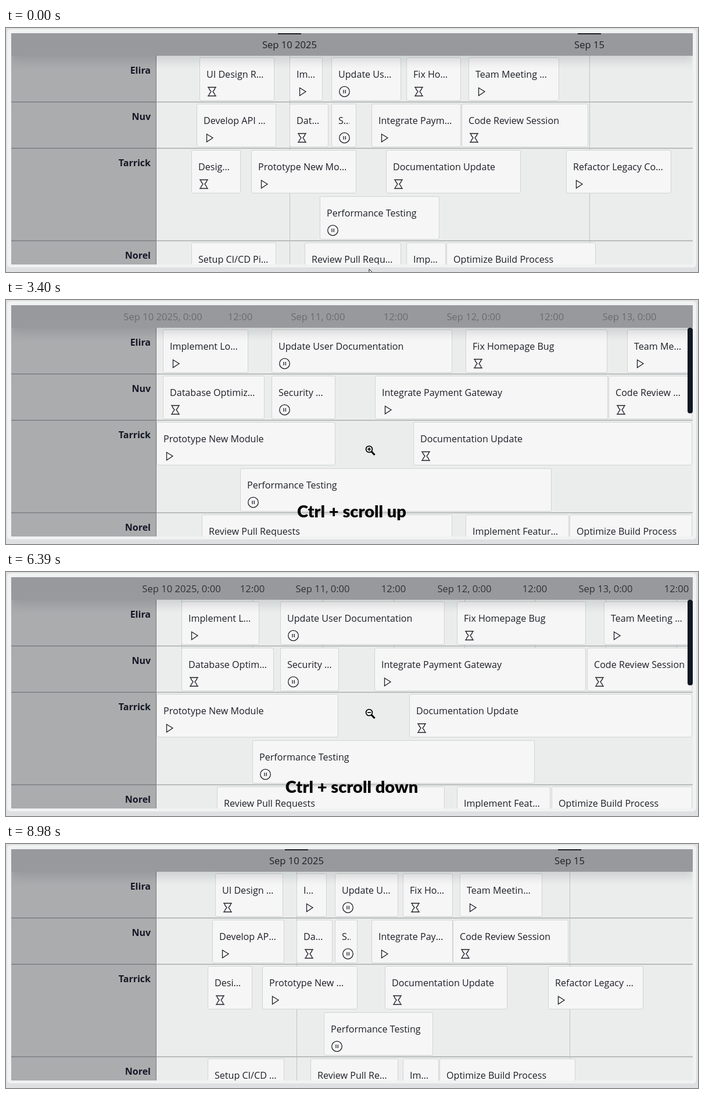
An HTML page that plays this animation: 1191 by 422 pixels, repeating every 9050 ms.

```html
<!DOCTYPE html>
<html lang="en">
<head>
<meta charset="utf-8">
<title>Zoomable schedule</title>
<style>
html, body { margin: 0; width: 100%; height: 100%; overflow: hidden; background: #dfe0e1; }
#stage { position: relative; width: 1191px; height: 422px; overflow: hidden; font-family: "Open Sans", "Noto Sans", sans-serif; color: #1d1f27; }
#stage * { box-sizing: border-box; }
#stage div, #stage svg { position: absolute; }
#panel { left: 2px; top: 2px; width: 1186px; height: 412px; border-radius: 6px; background: #f1f2f2; }
#view { left: 9px; top: 9px; width: 1173px; height: 400px; overflow: hidden; background: #eaedec; }
#space { left: -9px; top: -9px; width: 1191px; height: 422px; }
#side { left: 9px; top: 48px; width: 250px; height: 374px; background: #abacae; border-right: 1px solid #77787b; }
#head { left: 9px; top: 9px; width: 1173px; height: 39px; background: #98999d; box-shadow: 0 9px 16px rgba(40, 44, 52, .15); }
.rule { left: 9px; width: 1173px; height: 2px; background: linear-gradient(90deg, #88898c 250px, #b9bbbc 250px); }
.person { right: 942px; font: 700 16px/22px "Open Sans", "Noto Sans", sans-serif; color: #141826; }
.card { height: 75px; overflow: hidden; background: #f6f6f6; border: 1px solid #d2d4d4; border-radius: 3px; }
.card .title { left: 11px; right: 11px; top: 16px; font-size: 16.1px; line-height: 25px; white-space: nowrap; overflow: hidden; text-overflow: ellipsis; }
.card svg { left: 11px; top: 48px; width: 22px; height: 22px; fill: none; stroke: #1d1f27; stroke-width: 1.3; }
.line { top: 48px; width: 1px; background: #c0c3c4; }
.bar { top: 8px; width: 40px; height: 3px; background: #1b1d24; }
.label { top: 17px; width: 200px; text-align: center; font-size: 16.6px; line-height: 24px; white-space: nowrap; }
#scroll { left: 1173px; top: 48px; width: 9px; height: 148px; border-radius: 4px; background: #101822; }
#caption { left: 295px; width: 600px; text-align: center; font: 900 29px/36px Lato, "Open Sans", sans-serif; color: #070707; white-space: nowrap; }
#cursor { left: 0; top: 0; width: 24px; height: 24px; overflow: visible; }
</style>
</head>
<body>
<div id="stage">
  <div id="panel"></div>
  <div id="view"><div id="space">
    <div id="lines"></div>
    <div id="side"></div>
    <div id="rows"></div>
    <div id="head"></div>
    <div id="ticks"></div>
    <div id="scroll"></div>
  </div></div>
  <div id="caption"></div>
  <svg id="cursor">
    <path id="arrow" d="M0 0V16L4 12.5 6.6 18.4 9 17.3 6.5 11.6H11.6Z" fill="#fff" stroke="#111"/>
    <g id="lens" stroke="#000" fill="none">
      <path d="M4 4L9.5 10" stroke-width="3.2"/>
      <circle r="5.4" fill="#fff" stroke-width="1.8"/>
      <path id="sign" stroke-width="1.7"/>
    </g>
  </svg>
</div>
<script>
const LOOP = 9050, LEFT = 259, RIGHT = 1181;
const ANCHOR_X = 625, ANCHOR_DAY = 1.3275, DAY_WIDTH = 103.2, ZOOM = 1.1;

const ICONS = {
  wait: '<path d="M2 2.5H17M2 17.5H17M4 2.5C4 7 7 8 8 10 7 12 4 13 4 17.5M15 2.5C15 7 12 8 11 10 12 12 15 13 15 17.5"/>',
  play: '<path d="M5.5 3.5L16 10 5.5 17Z"/>',
  pause: '<circle cx="10.5" cy="10" r="8.8"/><path d="M9 7V13M12.3 7V13"/>'
};

// title, icon, start and end in days after Sep 10, optional second lane
const PEOPLE = [
  { name: 'Elira', top: 48, tasks: [
    ['UI Design Review', 'wait', -1.5, -.25],
    ['Implement Login', 'play', 0, .55],
    ['Update User Documentation', 'pause', .7, 1.862],
    ['Fix Homepage Bug', 'wait', 1.947, 2.86],
    ['Team Meeting Preparation', 'play', 2.988, 4.5]] },
  { name: 'Nuv', top: 128, tasks: [
    ['Develop API Endpoint', 'play', -1.55, -.225],
    ['Database Optimization', 'wait', 0, .654],
    ['Security Audit', 'pause', .7, 1.112],
    ['Integrate Payment Gateway', 'play', 1.365, 2.862],
    ['Code Review Session', 'wait', 2.867, 4.985]] },
  { name: 'Tarrick', top: 208, tasks: [
    ['Design Mockups', 'wait', -1.637, -.81],
    ['Prototype New Module', 'play', -.638, 1.11],
    ['Documentation Update', 'wait', 1.613, 3.86],
    ['Refactor Legacy Code', 'play', 4.613, 6.363],
    ['Performance Testing', 'pause', .5, 2.5, 1]] },
  { name: 'Norel', top: 368, tasks: [
    ['Setup CI/CD Pipeline', 'wait', -1.637, -.225],
    ['Review Pull Requests', 'pause', .25, 1.862],
    ['Implement Feature X', 'play', 1.947, 2.611],
    ['Optimize Build Process', 'wait', 2.616, 5.11]] }
];

// start, interval, first level, last level of each wheel burst
const BURSTS = [[2050, 45, 1, 9], [3260, 1, 10, 10], [3410, 20, 11, 14], [5890, 70, 13, 9], [6800, 70, 8, -1]];
const REDRAWS = [2410, 3305, 3470, 6170, 7430];
const PATH = [[0, 625, 417], [70, 625, 410], [300, 622, 300], [550, 619, 235], [1099, 619, 235], [1100, 619, 242],
  [1370, 619, 242], [1580, 625, 258], [4810, 625, 258], [5090, 625, 243], [8770, 625, 243], [8980, 625, 420]];

const $ = id => document.getElementById(id);
const clamp = (v, lo = 0, hi = 1) => Math.min(hi, Math.max(lo, v));
const ramp = (t, from, to) => clamp((t - from) / (to - from));

function add(parent, cls, html = '') {
  const el = document.createElement('div');
  el.className = cls;
  el.innerHTML = html;
  return parent.appendChild(el);
}

const cards = [];
for (const { name, top, tasks } of PEOPLE) {
  if (top > 48) add($('rows'), 'rule').style.top = top - 1 + 'px';
  for (const [title, icon, start, end, lane = 0] of tasks) {
    const el = add($('rows'), 'card', `<div class="title">${title}</div><svg>${ICONS[icon]}</svg>`);
    el.style.top = top + 3 + lane * 80 + 'px';
    cards.push({ el, start, end });
  }
  const person = add($('space'), 'person', name);
  person.style.top = top + 14 + 'px';
  $('space').insertBefore(person, $('head'));
}
const ticks = Array.from({ length: 12 }, () => ({
  line: add($('lines'), 'line'), bar: add($('ticks'), 'bar'), label: add($('ticks'), 'label')
}));

function zoomLevel(t) {
  let level = 0;
  for (const [start, gap, from, to] of BURSTS) {
    if (t < start) break;
    const count = Math.min(Math.floor((t - start) / gap), Math.abs(to - from));
    level = from + Math.sign(to - from) * count;
  }
  return level;
}

function tickText(day, step, first) {
  const whole = Math.floor(day), clock = day > whole ? '12:00' : '0:00';
  if (day > whole && !first) return clock;
  return `Sep ${10 + whole}${first ? ' 2025' : ''}${step < 1 ? ', ' + clock : ''}`;
}

function drawTicks(t, scale, toX) {
  const step = scale / 2 >= 115 ? .5 : scale >= 115 ? 1 : 5;
  const age = t - REDRAWS.reduce((last, s) => s <= t ? s : last, -1000);
  const firstDay = Math.ceil((ANCHOR_DAY + (LEFT - ANCHOR_X) / scale) / step) * step;
  ticks.forEach(({ line, bar, label }, i) => {
    const day = firstDay + i * step, x = Math.round(toX(day));
    const display = x <= RIGHT ? 'block' : 'none';
    for (const el of [line, bar, label]) el.style.display = display;
    line.style.left = x + 'px';
    line.style.height = 361 * ramp(age, 100, 550) + 'px';
    bar.style.left = x - 20 + 'px';
    bar.style.opacity = ramp(age, 340, 550);
    label.style.left = x - 100 + 'px';
    label.style.opacity = ramp(age, 0, 260);
    label.textContent = tickText(day, step, i === 0);
  });
}

function drawCards(toX) {
  for (const { el, start, end } of cards) {
    const from = clamp(Math.round(toX(start)), LEFT, RIGHT), to = clamp(Math.round(toX(end)), LEFT, RIGHT);
    el.style.display = to - from > 1 ? 'block' : 'none';
    el.style.left = from + 'px';
    el.style.width = to - from + 'px';
  }
}

function drawCursor(t) {
  const i = Math.max(1, PATH.findIndex(p => p[0] > t));
  const [a, b] = t >= 8980 ? [PATH.at(-1), PATH.at(-1)] : [PATH[i - 1], PATH[i]];
  const k = a === b ? 0 : ramp(t, a[0], b[0]);
  const x = a[1] + (b[1] - a[1]) * k, y = a[2] + (b[2] - a[2]) * k;
  $('cursor').style.transform = `translate(${Math.round(x)}px, ${Math.round(y)}px)`;
  $('cursor').style.display = t < 8980 ? 'block' : 'none';
  const lens = t >= 1100 && t < 8840;
  $('arrow').style.display = lens ? 'none' : 'inline';
  $('lens').style.display = lens ? 'inline' : 'none';
  $('sign').setAttribute('d', t < 5090 ? 'M-3 0H3M0 -3V3' : 'M-3 0H3');
}

function drawCaption(t) {
  const up = t < 5500, caption = $('caption');
  caption.textContent = up ? 'Ctrl + scroll up' : 'Ctrl + scroll down';
  caption.style.top = up ? '347px' : '353px';
  caption.style.opacity = up ? +(t >= 2050) * (1 - ramp(t, 4810, 5090)) : +(t >= 5890) * (1 - ramp(t, 8770, 8980));
}

function render(t) {
  const scale = DAY_WIDTH * ZOOM ** zoomLevel(t);
  const toX = day => ANCHOR_X + (day - ANCHOR_DAY) * scale;
  drawTicks(t, scale, toX);
  drawCards(toX);
  drawCaption(t);
  drawCursor(t);
  $('scroll').style.opacity = ramp(t, 70, 280) * (1 - ramp(t, 8770, 8980));
}

const begin = performance.now();
function frame() {
  render((performance.now() - begin) % LOOP);
  requestAnimationFrame(frame);
}
frame();
</script>
</body>
</html>
```
